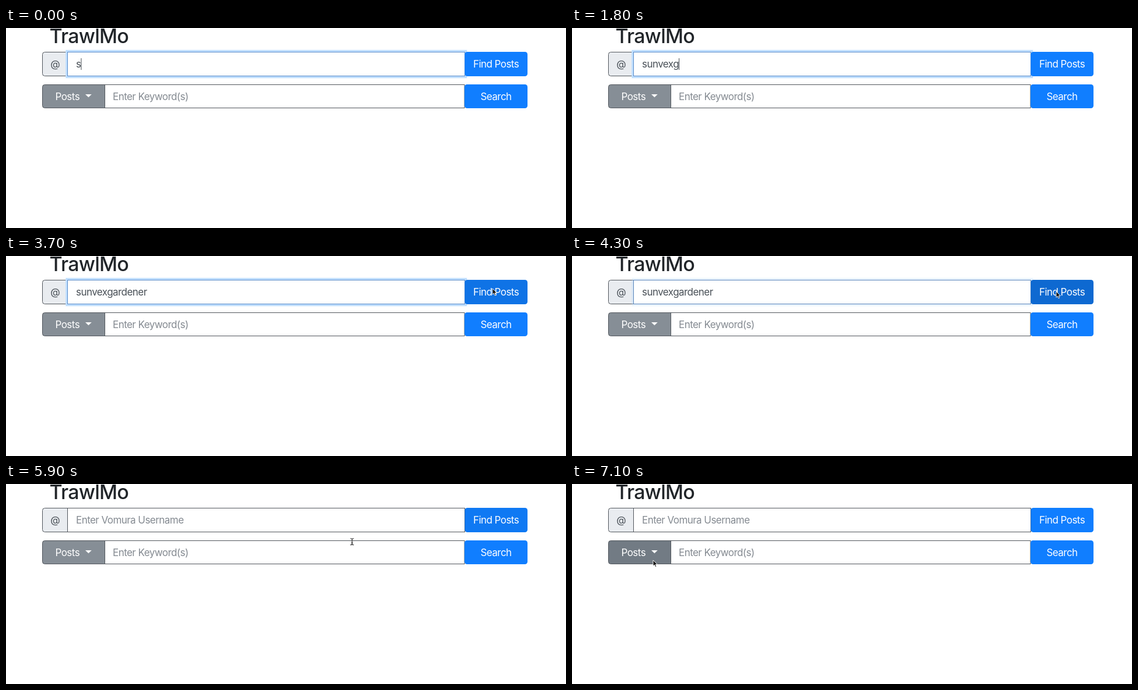
An HTML page that plays this animation: 960x344 px, repeating every 7200 ms.

```html
<!DOCTYPE html>
<html lang="en">
<head>
<meta charset="utf-8">
<title>Post search</title>
<style>
  html, body { margin: 0; width: 100%; height: 100%; overflow: hidden; background: #fff; }
  svg { display: block; width: 960px; height: 344px; }
  text { font: 17px Inter, "Open Sans", sans-serif; letter-spacing: -0.55px; fill: #495057; white-space: pre; }
  .title { font-size: 34px; font-weight: 500; letter-spacing: -0.75px; fill: #212529; }
  .hint { fill: #848a91; }
  .label { fill: #fff; }
  .mid { text-anchor: middle; }
  .edge { stroke: #50555b; stroke-width: 1; }
</style>
</head>
<body>
<svg viewBox="0 0 960 344">
  <text class="title" x="74.5" y="26">TrawlMo</text>

  <path class="edge" fill="#e9ecf0" d="M106 41.5H66.5a4 4 0 0 0-4 4V78.500a4 4 0 0 0 4 4H106Z"/>
  <text class="mid" x="84.3" y="68">@</text>
  <rect id="glow" x="104" y="39.500" width="684.500" height="45" fill="none" stroke="#bfdeff" stroke-width="3.500"/>
  <rect id="field" x="105.500" y="41.500" width="681" height="41" fill="#fff"/>
  <text id="user" x="120" y="68.300"></text>
  <rect id="caret" y="52" width="1" height="20" fill="#444b52"/>
  <rect id="ring" x="784.700" y="39.300" width="111" height="45.400" rx="6" fill="none" stroke="#87bfff" stroke-width="3.500"/>
  <rect id="find" x="786.500" y="41" width="107.500" height="42" rx="4.400"/>
  <text class="label mid" x="840" y="68.300">Find Posts</text>

  <path id="menu" class="edge" d="M170 97.500H66.500a4 4 0 0 0-4 4V133.500a4 4 0 0 0 4 4H170Z"/>
  <rect class="edge" x="169.500" y="97.500" width="616.500" height="40" fill="#fff"/>
  <text class="label" x="84.500" y="124">Posts</text>
  <path fill="#fff" d="M136 114h10.800l-5.400 5.300Z"/>
  <text class="hint" x="183" y="124">Enter Keyword(s)</text>
  <rect x="786" y="97" width="108" height="41" rx="4.400" fill="#107eff"/>
  <text class="label mid" x="840" y="124">Search</text>

  <g id="pointer">
    <path id="arrow" fill="#111" stroke="#fff" stroke-width="0.900" stroke-linejoin="round"
      d="M0 0V10.200L2.400 8L4 11.800L5.800 11L4.200 7.400H7.400Z"/>
    <path id="beam" fill="none" stroke="#222" stroke-width="1.100"
      d="M-3 -5.500Q0 -5.500 0 -4Q0 -5.500 3 -5.500M0 -4V4M-3 5.500Q0 5.500 0 4Q0 5.500 3 5.500M-1.500 2H1.500"/>
  </g>
</svg>
<script>
  const LOOP = 7200, RELOAD = 5100, NAME = "sunvexgardener";
  const BLUE = [16, 126, 255], BLUE_HOVER = [14, 105, 209];
  const GREY = [134, 142, 150], GREY_HOVER = [114, 123, 132];
  const EDGE = [80, 85, 91], FOCUS = [88, 138, 200];
  // time, x, y
  const PATH = [
    [3150, 640, 46], [3300, 780, 30], [3400, 880, 27], [3500, 944, 36], [3600, 900, 48],
    [3700, 834, 56], [3900, 830, 61], [5700, 830, 61], [5800, 770, 80], [6000, 420, 118],
    [6200, 243, 112], [6400, 150, 134], [6500, 134, 140], [6700, 135, 139], [6900, 139, 131]
  ];
  const el = id => document.getElementById(id);
  const [glow, field, user, caret, ring, find, menu, pointer, arrow, beam] =
    ["glow", "field", "user", "caret", "ring", "find", "menu", "pointer", "arrow", "beam"].map(el);

  const ramp = (t, start, span = 150) => Math.min(1, Math.max(0, (t - start) / span));
  const mix = (a, b, k) => `rgb(${a.map((v, i) => Math.round(v + (b[i] - v) * k))})`;
  const show = (node, on) => node.setAttribute("visibility", on ? "visible" : "hidden");

  function typedCount(t) {
    const slow = 1 + Math.floor(t / 290);
    return t < 1740 ? slow : Math.min(NAME.length, 7 + Math.floor((t - 1740) / 160));
  }

  function pointAt(t) {
    const i = PATH.findIndex(p => p[0] > t);
    if (i < 0) return PATH[PATH.length - 1].slice(1);
    const a = PATH[Math.max(0, i - 1)], b = PATH[i];
    const k = ramp(t, a[0], b[0] - a[0] || 1);
    return [a[1] + (b[1] - a[1]) * k, a[2] + (b[2] - a[2]) * k];
  }

  function drawPointer(t) {
    const [x, y] = pointAt(t);
    const overUser = x > 106 && x < 786 && y > 41 && y < 83;
    const overKeys = x > 170 && x < 786 && y > 97 && y < 138;
    const text = overUser || overKeys, on = t >= PATH[0][0];
    pointer.setAttribute("transform", `translate(${x} ${y})`);
    show(arrow, on && !text);
    show(beam, on && text);
  }

  function drawForm(t) {
    const loaded = t >= RELOAD;
    user.textContent = loaded ? "Enter Vomura Username" : NAME.slice(0, typedCount(t));
    user.setAttribute("class", loaded ? "hint" : "");
    show(caret, t < 3300 || (t >= 3800 && t < 4220));
    if (!loaded) caret.setAttribute("x", 120 + user.getComputedTextLength());

    const focus = 1 - ramp(t, 4220, 120);
    glow.setAttribute("opacity", focus);
    field.setAttribute("stroke", mix(EDGE, FOCUS, 1 - ramp(t, 4280)));
    ring.setAttribute("opacity", loaded ? 0 : ramp(t, 4300));

    const hover = loaded ? ramp(t, 5700, 60) * (1 - ramp(t, 5790)) : ramp(t, 3620);
    find.setAttribute("fill", mix(BLUE, BLUE_HOVER, hover));
    const over = ramp(t, 6360) * (1 - ramp(t, 6470)) + ramp(t, 6740);
    menu.setAttribute("fill", mix(GREY, GREY_HOVER, over));
  }

  const begin = performance.now();
  function frame() {
    const t = (performance.now() - begin) % LOOP;
    drawForm(t);
    drawPointer(t);
    requestAnimationFrame(frame);
  }
  frame();
</script>
</body>
</html>
```
